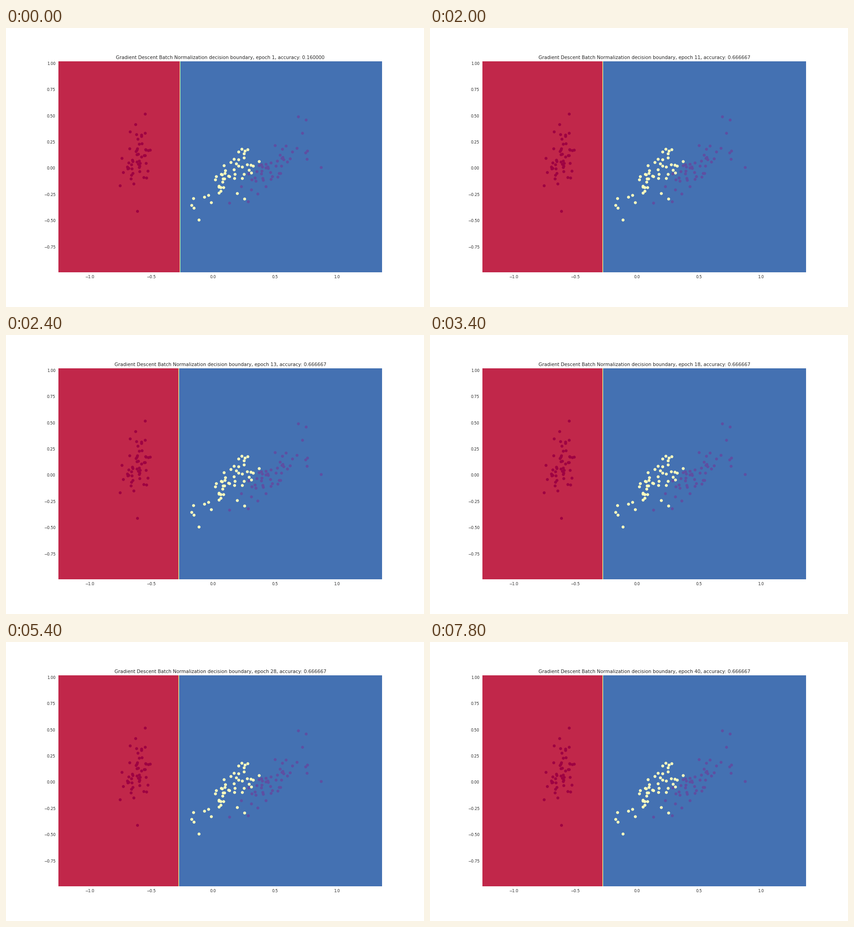
A matplotlib script that plays this animation: 917x611 px, repeating every 8000 ms.

```python
import numpy as np
import matplotlib.pyplot as plt
from matplotlib.animation import FuncAnimation

W, H, DPI = 917, 611, 64
PT = 72 / DPI              # points per pixel
EPOCHS, STEP_MS = 40, 200
X0, X1, Y0, Y1 = -1.2522, 1.3678, -0.992, 1.018
INK = "#262626"
CMAP = plt.get_cmap("Spectral")

plt.rcParams["font.family"] = "DejaVu Sans"
rng = np.random.default_rng(7)

fig = plt.figure(figsize=(W / DPI, H / DPI), dpi=DPI, facecolor="white")
ax = fig.add_axes([0.125, 0.125, 0.775, 0.755])
ax.set(xlim=(X0, X1), ylim=(Y0, Y1),
       xticks=np.arange(-1, 1.1, 0.5), yticks=np.arange(-0.75, 1.1, 0.25))
ax.tick_params(length=0, pad=5.94 * PT, labelsize=8.49 * PT, labelcolor=INK)
ax.spines[:].set_visible(False)
title = ax.set_title("", fontsize=10.33 * PT, color=INK, pad=5.1 * PT)

# Predicted class per grid column, and the filled regions it gives
cols = np.arange(263)
xs = np.linspace(X0, X1, cols.size)


def regions(pred):
    z = np.vstack([pred, pred]).astype(float)
    field = ax.contourf(xs, [Y0, Y1], z, levels=np.linspace(0, 2, 9),
                        cmap=CMAP, antialiased=True)
    field.set_clip_on(False)
    return field


fields = {
    "start": regions(np.where(cols < 99, 0, 2)),
    "blue": regions(np.where(cols < 98, 0, 2)),
    "yellow": regions(np.select([cols < 98, cols == 98], [0, 2], 1)),
}


def cluster(center, spread, corr, outliers, total=50):
    """Correlated Gaussian core with evenly ranked radii, plus outliers."""
    n = total - len(outliers)
    r = np.sqrt(-2 * np.log(1 - 0.88 * (np.arange(n) + 0.5) / n))
    a = rng.uniform(0, 2 * np.pi, n)
    u, v = r * np.cos(a), r * np.sin(a)
    v = corr * u + np.sqrt(1 - corr ** 2) * v
    core = np.array(center) + np.column_stack([u, v]) * spread
    return np.vstack([core, outliers])


clusters = [
    cluster((-0.61, 0.08), (0.06, 0.15), 0.35,
            [(-0.552, 0.52), (-0.627, 0.42), (-0.673, 0.35),
             (-0.614, -0.41), (-0.754, -0.166), (-0.738, 0.095)]),
    cluster((0.135, -0.055), (0.12, 0.135), 0.7,
            [(-0.117, -0.493), (-0.174, -0.352), (-0.157, -0.378),
             (-0.161, -0.288), (0.252, -0.29), (0.193, -0.24),
             (0.37, 0.065), (0.279, 0.18)]),
    cluster((0.463, 0.017), (0.127, 0.129), 0.75,
            [(0.687, 0.49), (0.75, 0.463), (0.722, 0.334), (0.871, 0.007),
             (0.133, -0.33), (0.281, -0.32), (0.362, -0.245),
             (0.757, 0.086), (0.762, 0.167), (0.749, 0.15)]),
]
for k, pts in enumerate(clusters):
    ax.scatter(*pts.T, s=(6.4 * PT) ** 2, color=CMAP(k / 2), linewidths=0)


def draw(i):
    epoch = i + 1
    shown = {1: "start", 12: "yellow"}.get(epoch, "blue")
    for name, field in fields.items():
        field.set_visible(name == shown)
    acc = 24 / 150 if epoch == 1 else 100 / 150
    title.set_text("Gradient Descent Batch Normalization decision boundary, "
                   f"epoch {epoch}, accuracy: {acc:.6f}")
    return [title]


anim = FuncAnimation(fig, draw, frames=EPOCHS, interval=STEP_MS,
                     repeat=True, repeat_delay=0, blit=False)
plt.show()
```
